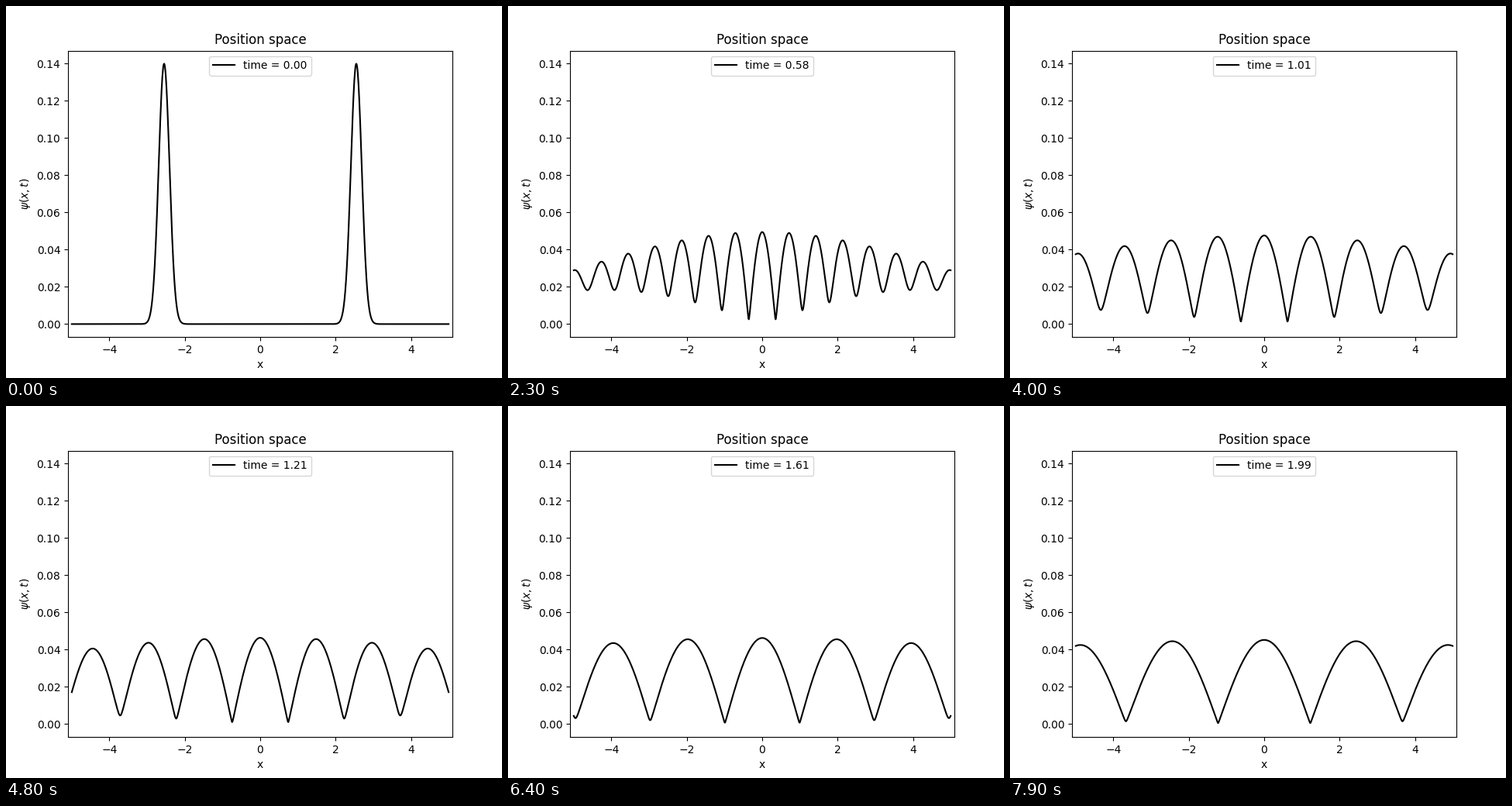
These frames come from a looping animation (640x480 px, 8000 ms). A matplotlib script:

```python
import matplotlib.pyplot as plt
import numpy as np
from matplotlib.animation import FuncAnimation

FRAMES = 80
INTERVAL = 100
DT = 2 * np.pi / 250

X0 = 2.55      # initial distance of each packet from the centre
K = 0.4        # inward momentum
A = 0.02076    # squared initial width

x = np.linspace(-5, 5, 1000)


def packet(t, side):
    """Free Gaussian packet starting at side * X0, drifting inward."""
    centre = side * (X0 - K * t)
    return np.exp(-(x - centre) ** 2 / (2 * (A + 1j * t)) - 1j * side * K * x)


def amplitude(t):
    psi = np.abs(packet(t, -1) + packet(t, 1))
    return psi / np.sqrt(np.sum(psi ** 2))


plt.rcParams["font.family"] = "DejaVu Sans"
fig, ax = plt.subplots(figsize=(6.4, 4.8), dpi=100)
line, = ax.plot(x, amplitude(0), color="black", lw=1.5, label="time = 0.00")
ax.set_xlim(-5.1, 5.1)
ax.set_ylim(-0.007, 0.147)
ax.set_title("Position space")
ax.set_xlabel("x")
ax.set_ylabel(r"$\psi(x,t)$")
label = ax.legend(loc="upper center").get_texts()[0]


def update(i):
    t = i * DT
    line.set_ydata(amplitude(t))
    label.set_text(f"time = {t:.2f}")
    return line, label


anim = FuncAnimation(fig, update, frames=FRAMES, interval=INTERVAL,
                     repeat=True, repeat_delay=0, blit=False)
plt.show()
```
